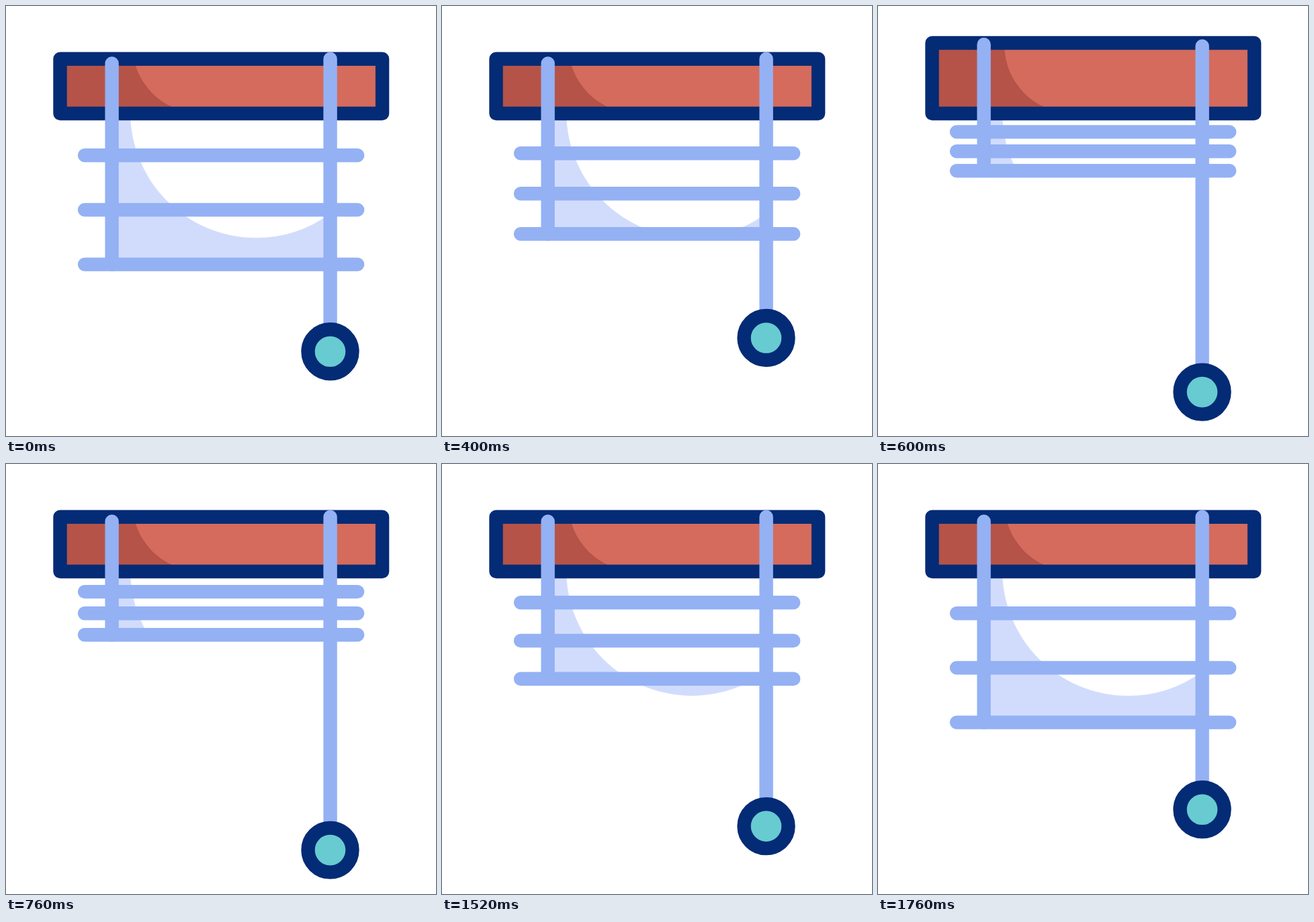
An HTML page for the animation above (2000 ms loop, 640x640 px).

```html
<!DOCTYPE html>
<html lang="en">
<head>
<meta charset="utf-8">
<title>Window blind</title>
<style>
  html, body { margin: 0; width: 100%; height: 100%; overflow: hidden; background: #fff; }
  svg { display: block; width: 100%; height: 100%; }
  .cord { fill: none; stroke: #94b1f4; stroke-width: 20.4; stroke-linecap: round; }
  .frame { fill: none; stroke: #042b75; stroke-width: 20.4; stroke-linejoin: round; }
</style>
</head>
<body>
<svg viewBox="0 0 640 640">
  <defs>
    <clipPath id="boxClip"><rect id="boxArea" x="80.5" width="479.6"/></clipPath>
  </defs>
  <path id="shade" fill="#d1dcfd"/>
  <g clip-path="url(#boxClip)">
    <rect width="640" height="200" fill="#b55348"/>
    <path fill="#d56b5d" d="M188.3 0V58.5A101 101 0 0 0 289.3 159.5V165H640V0Z"/>
  </g>
  <path id="box" class="frame"/>
  <path id="bars" class="cord"/>
  <path id="cords" class="cord"/>
  <circle id="ring" class="frame" cx="482.5" r="33" style="fill:#67cbd1"/>
</svg>
<script>
  const LOOP = 2000;
  const $ = id => document.getElementById(id);
  const [shade, box, boxArea, bars, cords, ring] =
    ['shade', 'box', 'boxArea', 'bars', 'cords', 'ring'].map($);

  // [time, value] keys, eased between neighbours
  const tracks = {
    bar:   [[80, 222.2], [400, 219.3], [600, 187.4], [760, 190.1], [1280, 190.1], [1760, 222.2]],
    gap:   [[80, 81.2], [400, 60], [600, 28.9], [760, 32.1], [1280, 32.1], [1760, 81.2]],
    ring:  [[80, 514.3], [400, 494], [600, 574.6], [1280, 574.6], [1700, 514.3]],
    top:   [[400, 78.8], [600, 55], [760, 78.8]],
    left:  [[400, 85.5], [600, 57.3], [760, 85.5]],
    right: [[400, 78.8], [600, 59.6], [760, 78.8]]
  };

  // cubic-bezier(1/6, 0, 5/6, 1)
  function ease(x) {
    let lo = 0, hi = 1;
    for (let i = 0; i < 24; i++) {
      const s = (lo + hi) / 2;
      const bx = 0.5 * s * (1 - s) ** 2 + 2.5 * s * s * (1 - s) + s ** 3;
      if (bx < x) lo = s; else hi = s;
    }
    return lo * lo * (3 - 2 * lo);
  }

  function at(keys, t) {
    if (t <= keys[0][0]) return keys[0][1];
    for (let i = 1; i < keys.length; i++) {
      const [t0, v0] = keys[i - 1], [t1, v1] = keys[i];
      if (t < t1) return v0 + (v1 - v0) * ease((t - t0) / (t1 - t0));
    }
    return keys[keys.length - 1][1];
  }

  function draw(t) {
    const v = {};
    for (const name in tracks) v[name] = at(tracks[name], t);
    const ys = [0, 1, 2].map(i => v.bar + i * v.gap);
    const low = ys[2];

    // shaded pane: everything left of and below the round highlight
    const dy = Math.min(low - 158, 187);
    const dx = Math.sqrt(187 ** 2 - dy ** 2);
    shade.setAttribute('d',
      `M157.5 158H185A187 187 0 0 0 ${372 - dx} ${158 + dy}` +
      (dx < 110.5
        ? `A187 187 0 0 0 ${372 + dx} ${158 + dy}A187 187 0 0 0 482.5 308.9V${low}H157.5Z`
        : `V${low}H157.5Z`));

    box.setAttribute('d', `M80.5 ${v.top}H560.1V160H80.5Z`);
    boxArea.setAttribute('y', v.top);
    boxArea.setAttribute('height', 160 - v.top);
    bars.setAttribute('d', ys.map(y => `M117 ${y}H523.2`).join(''));
    cords.setAttribute('d', `M157.6 ${v.left}V${low}M482.6 ${v.right}V${v.ring}`);
    ring.setAttribute('cy', v.ring);
  }

  const start = performance.now();
  function tick() {
    draw((performance.now() - start) % LOOP);
    requestAnimationFrame(tick);
  }
  tick();
</script>
</body>
</html>
```
